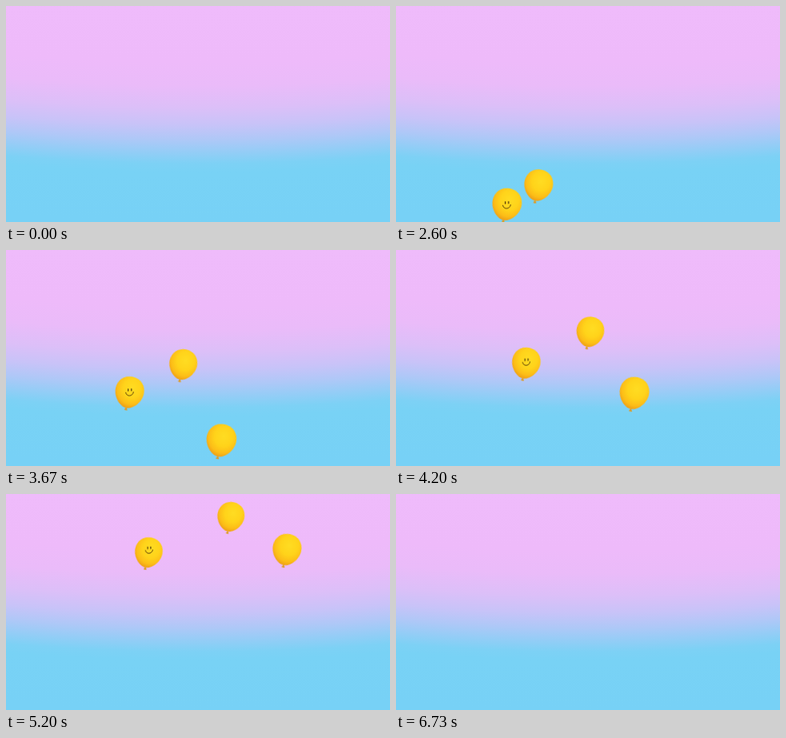
An HTML page without scripts that plays this animation: 480x270 px, repeating every 7190 ms.

```html
<!DOCTYPE html>
<html lang="en">
<head>
<meta charset="utf-8">
<title>Balloons rising</title>
<style>
  html, body { margin: 0; width: 100%; height: 100%; overflow: hidden; background: #78d2f6; }
  svg { display: block; width: 100vw; height: 100vh; }

  .balloon { animation: rise 7190ms infinite; }
  .face { animation: lift 7190ms linear infinite; }

  /* Each balloon supplies its own poses; steps() keeps the 15 fps cadence. */
  @keyframes rise {
    0%     { transform: translate(0, 400px) scale(1); animation-timing-function: step-end; }
    22.25% { transform: var(--p0); animation-timing-function: steps(15, end); }
    36.16% { transform: var(--p1); animation-timing-function: steps(16, end); }
    50.99% { transform: var(--p2); animation-timing-function: steps(17, end); }
    66.75% { transform: var(--p3); animation-timing-function: steps(12, end); }
    77.88% { transform: var(--p4); animation-timing-function: steps(16, end); }
    92.72% { transform: var(--p5); animation-timing-function: step-end; }
    93.6%, 100% { transform: translate(0, 400px) scale(1); }
  }

  /* The face drifts upward as the balloon turns. */
  @keyframes lift {
    0%, 36.16% { transform: translate(-.3px, 1.3px); }
    50.99% { transform: translate(0, .4px); }
    66.75% { transform: translate(.4px, -2.2px); }
    77.88%, 100% { transform: translate(.6px, -3.2px); }
  }

  .smiley {
    --p0: translate(124.5px, 305px) scale(1.05);
    --p1: translate(138.5px, 248px) scale(1.02);
    --p2: translate(154.3px, 178px) scale(1);
    --p3: translate(171.8px, 100.3px) scale(.97);
    --p4: translate(184.5px, 46.2px) scale(.95);
    --p5: translate(201px, -17px) scale(.93);
  }
  .middle {
    --p0: translate(144.5px, 288px) scale(1.02);
    --p1: translate(178px, 224.2px) scale(1);
    --p2: translate(221.3px, 143.4px) scale(.97);
    --p3: translate(266.6px, 56.7px) scale(.95);
    --p4: translate(295.2px, .8px) scale(.93);
    --p5: translate(326px, -62px) scale(.91);
  }
  .right {
    --p0: translate(170px, 450px) scale(1.06);
    --p1: translate(215px, 351px) scale(1.06);
    --p2: translate(269px, 238.2px) scale(1.04);
    --p3: translate(330px, 112.6px) scale(1.01);
    --p4: translate(372px, 26.8px) scale(.99);
    --p5: translate(420px, -75px) scale(.97);
  }
</style>
</head>
<body>
<svg viewBox="0 0 480 270" preserveAspectRatio="none">
  <defs>
    <!-- Very large circle, so the horizon bows gently. -->
    <radialGradient id="sky" gradientUnits="userSpaceOnUse" cx="240" cy="-2700" fr="2700" r="2970">
      <stop offset="0" stop-color="#efbbfb"/>
      <stop offset=".26" stop-color="#eebafa"/>
      <stop offset=".37" stop-color="#eabbf9"/>
      <stop offset=".47" stop-color="#dcbff8"/>
      <stop offset=".55" stop-color="#c8c3f8"/>
      <stop offset=".62" stop-color="#aec8f7"/>
      <stop offset=".68" stop-color="#93cdf6"/>
      <stop offset=".73" stop-color="#7dd1f5"/>
      <stop offset=".77" stop-color="#78d2f5"/>
      <stop offset="1" stop-color="#77d1f6"/>
    </radialGradient>
    <radialGradient id="skin" cx=".56" cy=".36" r=".68">
      <stop offset="0" stop-color="#ffdc22"/>
      <stop offset=".45" stop-color="#ffd31a"/>
      <stop offset=".75" stop-color="#fcbd17"/>
      <stop offset="1" stop-color="#ea9614"/>
    </radialGradient>
    <g id="body" transform="rotate(12)">
      <path d="M0 18.5 L2.2 22.4 Q0 23.2 -2 22.4Z" fill="#dd9c26"/>
      <path d="M0 -20 C10.5 -20 18 -12 18 -2 C18 9 8.5 19.7 0 19.7 C-8.5 19.7 -18 9 -18 -2 C-18 -12 -10.5 -20 0 -20Z" fill="url(#skin)"/>
    </g>
  </defs>

  <rect width="480" height="270" fill="url(#sky)"/>

  <g class="balloon right"><use href="#body"/></g>
  <g class="balloon middle"><use href="#body"/></g>
  <g class="balloon smiley">
    <use href="#body"/>
    <g class="face" fill="none" stroke="#4a3208" stroke-linecap="round">
      <path d="M-1.6 -4.6 V-2.2 M2.4 -4.9 V-2.5" stroke-width="1.2"/>
      <path d="M-4.6 -.2 C-4 5.2 4.2 5 4.9 -.8" stroke-width=".9"/>
    </g>
  </g>
</svg>
</body>
</html>
```
